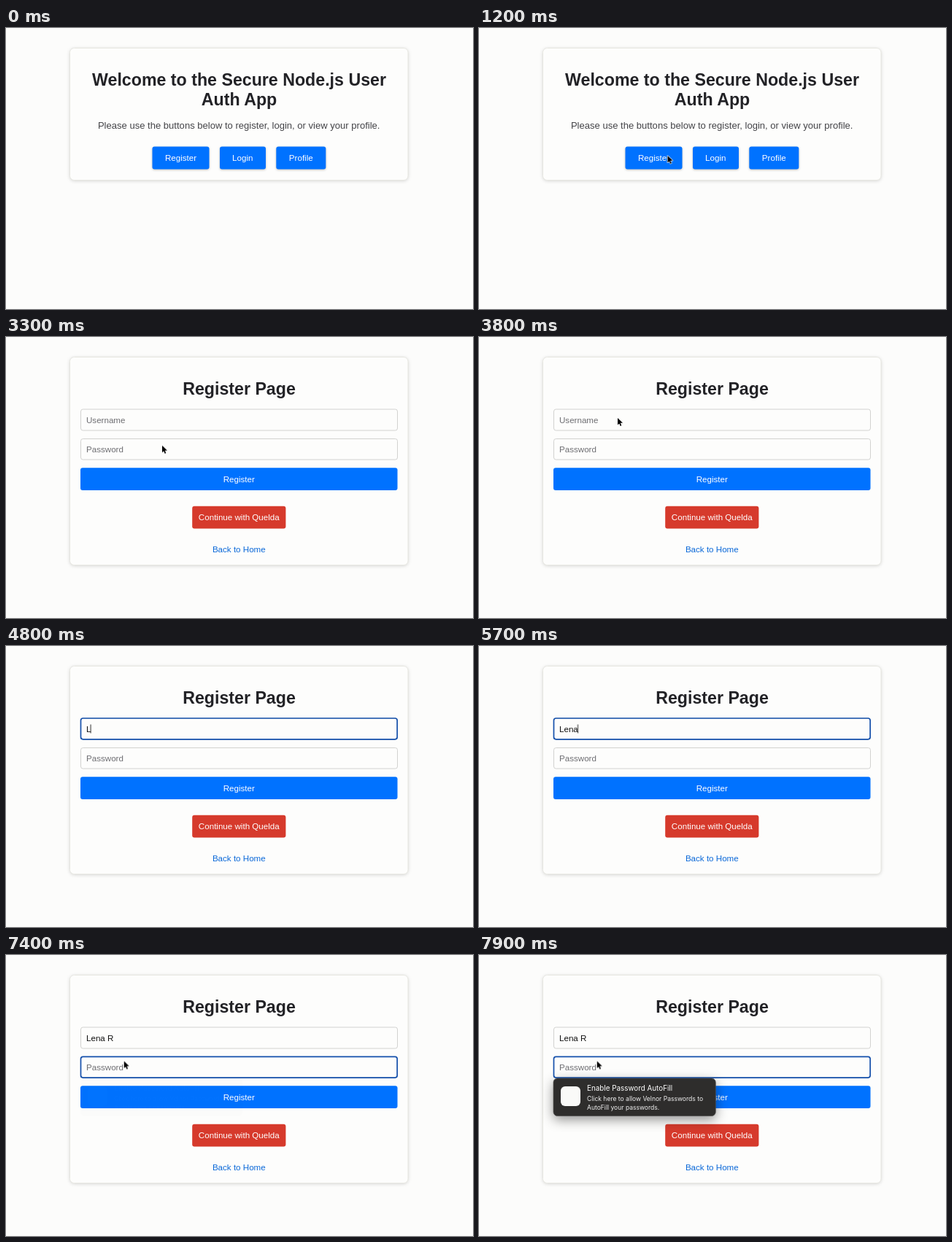
Animation, 640 px wide and 385 px high, one loop 8000 ms. Source, as an HTML page:

```html
<!DOCTYPE html>
<html lang="en">
<head>
<meta charset="utf-8">
<title>Register flow</title>
<style>
html, body { margin: 0; width: 100%; height: 100%; overflow: hidden; background: #fcfcfb; }
svg { display: block; width: 100vw; height: 100vh; }
text { font: 11.6px "Liberation Sans", Arial, sans-serif; fill: #fff; white-space: pre; }
.mid { text-anchor: middle; }
.title { font-size: 23.2px; font-weight: bold; fill: #222226; }
.lead { font-size: 13.05px; fill: #444448; }
.hint { fill: #6e6e72; }
.link { fill: #0a68d8; }
.entry { fill: #111; }
.card { fill: #fdfdfc; stroke: #e6e6e0; filter: drop-shadow(0 1px 2px rgba(0, 0, 0, .14)); }
.btn { fill: #0072ff; }
.lift { filter: drop-shadow(0 1px 1.5px rgba(0, 0, 0, .25)); }
.field { fill: #fdfdfc; stroke: #d2d2d0; }
.ring { fill: none; stroke: #1450ac; stroke-width: 1.7; }
.popup { fill: #2e2d2c; stroke: #525150; stroke-width: .7; filter: drop-shadow(0 5px 8px rgba(0, 0, 0, .42)); }
.head, .small { font-family: Inter, "Open Sans", sans-serif; }
.head { font-size: 9.85px; }
.small { font-size: 8.55px; fill: #f0f0f0; }

/* Every part shares one 8 s clock: 1% is 80 ms. */
.t { animation: 8s step-end infinite; }
.home { animation-name: home; }
.form { animation-name: form; }
.name-hint { animation-name: name-hint; }
.name-ring { animation-name: name-ring; }
.pass-ring { animation-name: pass-ring; }
.caret { animation-name: caret, caret-move; }
.offer { animation: offer 8s linear infinite; }
.pointer { animation: move 8s ease-in-out infinite; }
.seen { animation-name: seen; }
.arrow { animation-name: arrow; }
.hand { animation-name: hand; }
.k1 { animation-name: k1; }
.k2 { animation-name: k2; }
.k3 { animation-name: k3; }
.k4 { animation-name: k4; }
.k5 { animation-name: k5; }

@keyframes home { 0% { opacity: 1 } 33.75%, 100% { opacity: 0 } }
@keyframes form { 0% { opacity: 0 } 33.75%, 100% { opacity: 1 } }
@keyframes name-hint { 0% { opacity: 1 } 58.75%, 100% { opacity: 0 } }
@keyframes name-ring { 0% { opacity: 0 } 48.75% { opacity: 1 } 91.25%, 100% { opacity: 0 } }
@keyframes pass-ring { 0% { opacity: 0 } 91.25%, 100% { opacity: 1 } }
@keyframes caret {
  0% { opacity: 0 } 48.75% { opacity: 1 } 53.75% { opacity: 0 }
  57.5% { opacity: 1 } 91.25%, 100% { opacity: 0 }
}
@keyframes caret-move {
  0% { transform: none }
  58.75% { transform: translateX(6.1px) }
  63.75% { transform: translateX(12.6px) }
  66.25% { transform: translateX(19px) }
  68.75% { transform: translateX(25.5px) }
  72.5% { transform: translateX(28.7px) }
  75%, 100% { transform: translateX(37px) }
}
@keyframes k1 { 0% { visibility: hidden } 58.75%, 100% { visibility: visible } }
@keyframes k2 { 0% { visibility: hidden } 63.75%, 100% { visibility: visible } }
@keyframes k3 { 0% { visibility: hidden } 66.25%, 100% { visibility: visible } }
@keyframes k4 { 0% { visibility: hidden } 68.75%, 100% { visibility: visible } }
@keyframes k5 { 0% { visibility: hidden } 75%, 100% { visibility: visible } }
@keyframes offer { 0%, 92.5% { opacity: 0 } 94.5%, 100% { opacity: 1 } }
@keyframes move {
  0%, 10% { transform: translate(300px, 385px) }
  14.5%, 35% { transform: translate(258.5px, 175px) }
  40.5%, 43% { transform: translate(214px, 148.7px) }
  47%, 84% { transform: translate(190px, 111px) }
  90%, 100% { transform: translate(161.7px, 145.5px) }
}
@keyframes seen {
  0% { opacity: 0 } 10% { opacity: 1 } 57.5% { opacity: 0 } 83.75%, 100% { opacity: 1 }
}
@keyframes arrow { 0% { opacity: 1 } 20% { opacity: 0 } 33.75%, 100% { opacity: 1 } }
@keyframes hand { 0% { opacity: 0 } 20% { opacity: 1 } 33.75%, 100% { opacity: 0 } }
</style>
</head>
<body>
<svg viewBox="0 0 640 385">
  <g class="t home">
    <rect class="card" x="87.5" y="27.5" width="463.5" height="181" rx="6"/>
    <g class="mid">
      <text class="title" x="319.5" y="79">Welcome to the Secure Node.js User</text>
      <text class="title" x="319.5" y="105.7">Auth App</text>
      <text class="lead" x="319.2" y="137.5">Please use the buttons below to register, login, or view your profile.</text>
      <g class="btn lift">
        <rect x="200.5" y="162.5" width="78" height="31" rx="3"/>
        <rect x="293" y="162.5" width="63" height="31" rx="3"/>
        <rect x="370.3" y="162.5" width="68" height="31" rx="3"/>
      </g>
      <text x="239.5" y="182">Register</text>
      <text x="324.3" y="182">Login</text>
      <text x="404.3" y="182">Profile</text>
    </g>
  </g>

  <g class="t form">
    <rect class="card" x="87.5" y="27.5" width="463.5" height="285" rx="6"/>
    <rect class="field" x="102.5" y="99" width="434" height="29" rx="3"/>
    <rect class="field" x="102.5" y="139.5" width="434" height="28.5" rx="3"/>
    <rect class="btn" x="102" y="179.3" width="434.5" height="30.7" rx="3"/>
    <rect x="255.2" y="231.8" width="128.2" height="30.7" rx="3" fill="#d63a2c"/>
    <g class="mid">
      <text class="title" x="319.5" y="79">Register Page</text>
      <text x="319.3" y="198.7">Register</text>
      <text x="319.3" y="251">Continue with Quelda</text>
      <text class="link" x="319.3" y="295">Back to Home</text>
    </g>
    <text class="hint t name-hint" x="110" y="117.5">Username</text>
    <text class="hint" x="110" y="157.5">Password</text>
    <text class="entry" x="110" y="117.5"><tspan class="t k1">L</tspan><tspan class="t k2">e</tspan><tspan class="t k3">n</tspan><tspan class="t k4">a</tspan><tspan class="t k5"> R</tspan></text>
    <path class="t caret" d="M110 107.5V119.5" stroke="#111" stroke-width=".9"/>
    <rect class="ring t name-ring" x="102.5" y="99" width="433.6" height="28.8" rx="3"/>
    <rect class="ring t pass-ring" x="102.5" y="139.3" width="433.6" height="28.8" rx="3"/>

    <g class="offer">
      <rect class="popup" x="102" y="169" width="222.3" height="51.5" rx="5.5"/>
      <rect x="112" y="180" width="27" height="27" rx="6" fill="#fafaf8"/>
      <text class="head" x="148" y="186">Enable Password AutoFill</text>
      <text class="small" x="148" y="200">Click here to allow Velnor Passwords to</text>
      <text class="small" x="148" y="211.5">AutoFill your passwords.</text>
    </g>
  </g>

  <g class="pointer">
    <g class="t seen" stroke-linejoin="round">
      <path class="t arrow" d="M0 0V9.5L2.2 7.4 3.7 11 5.3 10.3 3.8 6.8H7Z" fill="#000" stroke="#fff" stroke-width="1.2" paint-order="stroke"/>
      <path class="t hand" transform="translate(-3.3)" d="M.8 1.3C.7 0 2.4-.2 2.8 1L4 4.3Q5.2 3.5 5.9 4.6 7 4 7.6 5.1 8.8 4.8 9.1 6.2L9.6 8.6Q9.6 10.4 8.6 11.6L4.6 11.9Q3.2 10.6.6 8.2C-.3 7.2.8 6.3 1.8 7L2.6 7.6Z" fill="#fff" stroke="#111" stroke-width=".9"/>
    </g>
  </g>
</svg>
</body>
</html>
```
